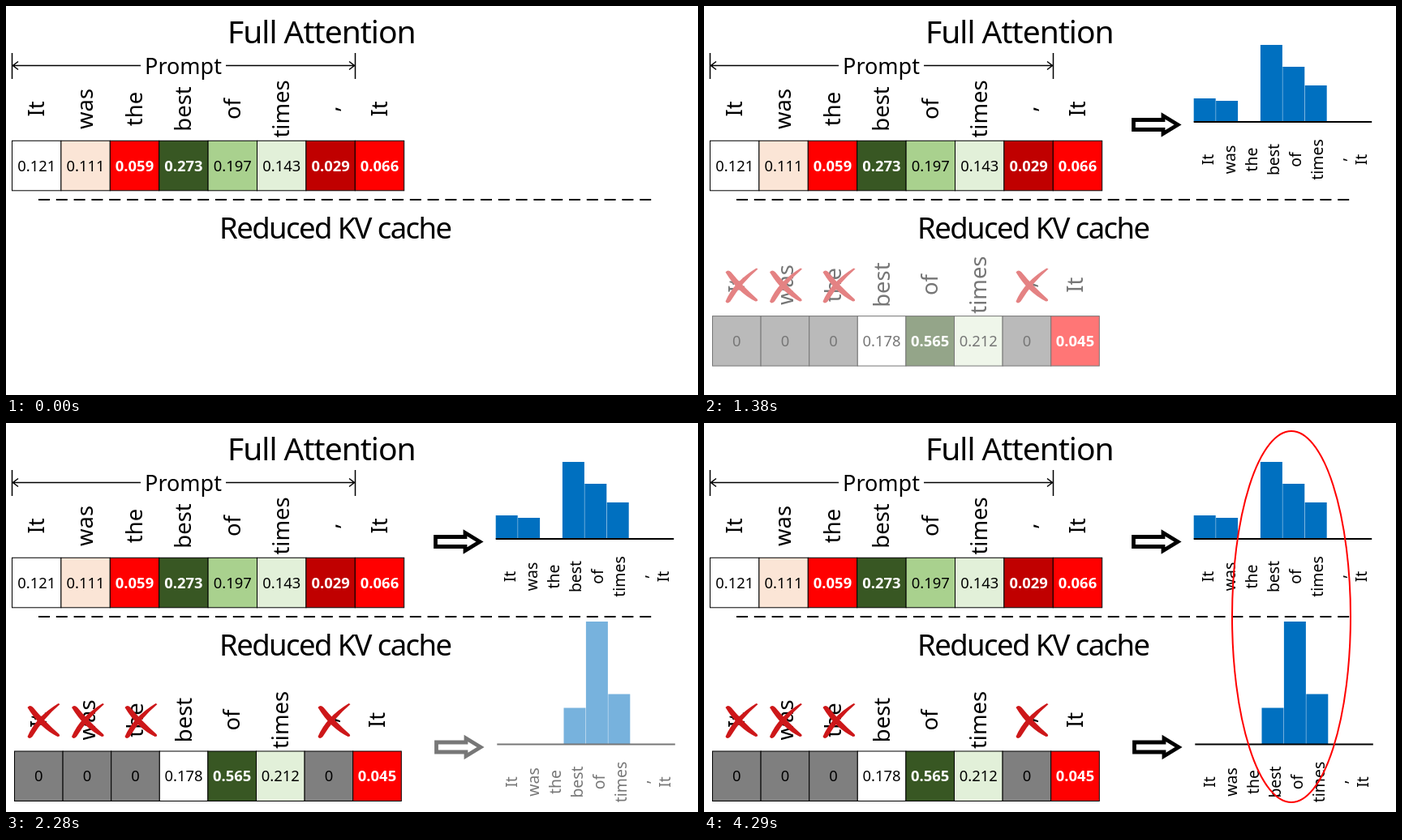
An HTML page that plays this animation: 853 by 480 pixels, repeating every 5760 ms.

```html
<!DOCTYPE html>
<html lang="en">
<head>
<meta charset="utf-8">
<title>Attention with a reduced KV cache</title>
<style>
  html, body { margin: 0; width: 100%; height: 100%; overflow: hidden; background: #fff; }
  svg { display: block; width: 853px; height: 480px; font-family: "Noto Sans", "Open Sans", sans-serif; }
  text { text-anchor: middle; }
</style>
</head>
<body>
<svg viewBox="0 0 853 480">
  <text x="388.8" y="46" font-size="39" letter-spacing="-1">Full Attention</text>
  <text x="405.8" y="286.5" font-size="36.5" letter-spacing="-1.6">Reduced KV cache</text>
  <text x="218.5" y="84" font-size="27">Prompt</text>
  <path d="M7.500 58V90M430.500 58V90M8 73.500H166M271 73.500H430M15 68.500L8.500 73.500L15 78.500M423 68.500L429.500 73.500L423 78.500"
    fill="none" stroke="#000" stroke-width="1.5"/>
  <g id="fullTable"></g>
  <g id="fullChart"></g>
  <g id="reducedTable"></g>
  <g id="reducedChart"></g>
  <path d="M40 239H796" stroke="#000" stroke-width="2" stroke-dasharray="14 7.8"/>
  <ellipse id="ring" cx="724" cy="239" rx="73" ry="229" fill="none" stroke="#f00" stroke-width="2"/>
</svg>
<script>
const LOOP = 5760, STEP = 60, FADE_STEPS = 15, DROP = 48;
const words = ['It', 'was', 'the', 'best', 'of', 'times', ',', 'It'];
const el = id => document.getElementById(id);

const wordRow = (x, y, pitch, size) => words.map((word, i) =>
  `<text transform="translate(${x + i * pitch} ${y}) rotate(-90)" font-size="${size}">${word}</text>`).join('');

// Each cell is [value, fill, white bold text?]
const table = (x, y, width, cells) => cells.map(([value, fill, strong], i) => {
  const left = x + i * width;
  return `<rect x="${left}" y="${y}" width="${width}" height="61.5" fill="${fill}" stroke="#000"/>
    <text x="${left + width / 2}" y="${y + 37.2}" font-size="18.4"
      ${strong ? 'fill="#fff" font-weight="600"' : ''}>${value}</text>`;
}).join('');

const cross = (x, y) => `<g transform="translate(${x} ${y})" fill="#cd1719">
  <path d="M-20-17Q-17-21-13-17Q0-1 19 16Q21 19 17 19Q-5 8-20-17z"/>
  <path d="M20-21Q0-4-14 19Q-18 23-20 19Q-10-5 18-22z"/></g>`;

const arrow = (x, y) => `<path transform="translate(${x} ${y})" fill="#fff" stroke="#000" stroke-width="4.8"
  d="M2.500-6H39V-11L57 0L39 11V6H2.500z"/>`;

const chart = (x, base, heights, arrowX, arrowY) => arrow(arrowX, arrowY)
  + heights.map((h, i) => h &&
    `<rect x="${x + i * 27.4}" y="${base - h}" width="27" height="${h}" fill="#0070c0"/>`).filter(Boolean).join('')
  + `<path d="M${x} ${base}h219.500" stroke="#000" stroke-width="2"/>`
  + wordRow(x + 24.2, base + 46.5, 27, 19.4);

el('fullTable').innerHTML = wordRow(47, 127, 60.4, 27.4) + table(7.5, 166.3, 60.4, [
  ['0.121', '#fff'], ['0.111', '#fbe5d6'], ['0.059', '#f00', 1], ['0.273', '#385723', 1],
  ['0.197', '#a9d18e'], ['0.143', '#e2f0d9'], ['0.029', '#c00000', 1], ['0.066', '#f00', 1]]);

const dropped = ['0', '#7f7f7f'];
el('reducedTable').innerHTML = wordRow(50, 366.5, 59.6, 27.4) + table(10.5, 405, 59.6, [
  dropped, dropped, dropped, ['0.178', '#fff'],
  ['0.565', '#385723', 1], ['0.212', '#e2f0d9'], dropped, ['0.045', '#f00', 1]])
  + [46.5, 101, 166.5, 404.5].map(x => cross(x, 368)).join('');

el('fullChart').innerHTML = chart(603.7, 143, [29, 26, 0, 95, 68, 45], 527, 146.5);
el('reducedChart').innerHTML = chart(605.3, 396.5, [0, 0, 0, 45, 151.5, 62], 528, 400);

function draw(now) {
  const t = now % LOOP;
  const tick = Math.floor(t / STEP);
  const progress = phase => Math.min(1, Math.max(0, tick / FADE_STEPS - phase));
  ['fullChart', 'reducedTable', 'reducedChart'].forEach((id, i) => el(id).setAttribute('opacity', progress(i)));
  el('reducedTable').setAttribute('transform', `translate(0 ${DROP * (progress(1) - 1)})`);
  const ringShown = t >= 2760 && t < 3760 || t >= 4290;
  el('ring').setAttribute('visibility', ringShown ? 'visible' : 'hidden');
}

let start;
function frame(now) {
  start ??= now;
  draw(now - start);
  requestAnimationFrame(frame);
}
draw(0);
requestAnimationFrame(frame);
</script>
</body>
</html>
```
